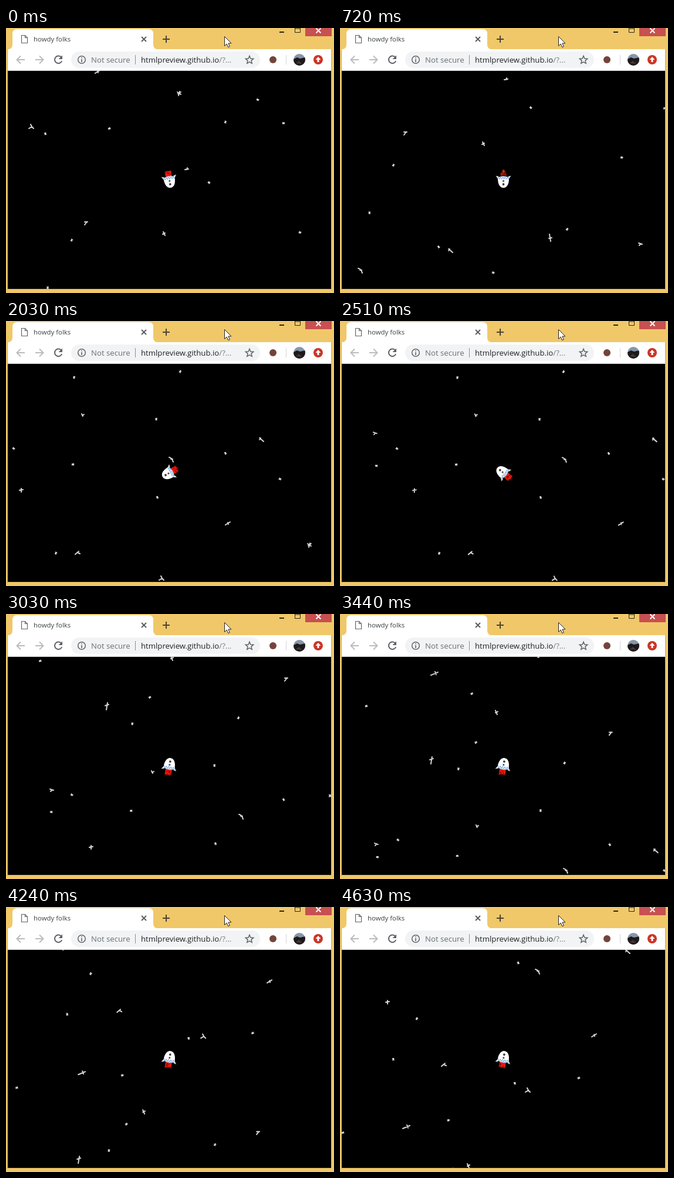
An HTML page with a canvas for the animation above (4.71 s loop, 559x451 px).

```html
<!DOCTYPE html>
<html lang="en">
<head>
<meta charset="utf-8">
<title>howdy folks</title>
<style>
  html, body { margin: 0; width: 100%; height: 100%; overflow: hidden; background: #f0c869; }
  svg, canvas { position: absolute; display: block; }
  svg { left: 0; top: 0; }
  canvas { left: 3px; top: 73px; background: #000; }
  text { font-family: "Open Sans", "Noto Sans", sans-serif; }
  .line { fill: none; stroke-width: 2; }
</style>
</head>
<body>
<svg width="559" height="451" viewBox="0 0 559 451">
  <rect width="559" height="451" fill="#f0c869"/>
  <rect x="2" y="36" width="553" height="409" fill="#d5b15c"/>
  <rect x="3" y="36" width="551" height="37" fill="#fff"/>
  <path d="M3 36.500Q11 36 11 28V10Q11 2 19 2H243Q251 2 251 10V28Q251 36 259 36.500Z" fill="#fff"/>
  <path d="M3 72.500H554" stroke="#d4d6d9"/>

  <!-- tab -->
  <path d="M26.500 12.500H32.500L36.500 16.500V25.500H26.500ZM32.500 12.500V16.500H36.500" fill="#fff" stroke="#5f6368" stroke-width="1.200"/>
  <text x="47" y="23" font-size="11.400" fill="#3c4043">howdy folks</text>
  <path class="line" d="M231 15L239 23M239 15L231 23" stroke="#5a5e62" stroke-width="1.600"/>
  <path class="line" d="M267 19H279M273 13V25" stroke="#4b4434"/>

  <!-- window buttons -->
  <path class="line" d="M466 7H474" stroke="#2b2618"/>
  <path d="M492.500 0V7.500H501.500V0M492 1H502" fill="none" stroke="#2b2618"/>
  <rect x="510" width="45" height="14" fill="#c75050"/>
  <path class="line" d="M528.500 0.500L536.500 8.500M536.500 0.500L528.500 8.500" stroke="#fff" stroke-width="1.700"/>

  <!-- toolbar -->
  <g class="line">
    <path d="M32 54H19M25 47.500L18.500 54L25 60.500M50 54H63M57 47.500L63.500 54L57 60.500" stroke="#babcbe"/>
    <path d="M94.300 50A6.300 6.300 0 1 0 95.200 56" stroke="#5f6368"/>
  </g>
  <path d="M96 46.500V53H89.500Z" fill="#5f6368"/>
  <rect x="111" y="40" width="322" height="28" rx="14" fill="#f1f3f4"/>
  <circle cx="129" cy="54" r="6.300" fill="none" stroke="#5f6368" stroke-width="1.500"/>
  <path d="M129 53V58M129 50V51.600" stroke="#5f6368" stroke-width="1.600"/>
  <text x="145" y="59" font-size="13.200" fill="#6b6f73">Not secure</text>
  <path d="M220.500 46V62" stroke="#8b8f94"/>
  <text x="230" y="59" font-size="13.200" fill="#202124">htmlpreview.github.io<tspan fill="#777b80">/?...</tspan></text>
  <path d="M415 47.500L416.900 52L421.700 52.400L418 55.600L419.200 60.300L415 57.800L410.800 60.300L412 55.600L408.300 52.400L413.100 52Z" fill="none" stroke="#5f6368" stroke-width="1.500"/>
  <circle cx="455" cy="54" r="6" fill="#74443a"/>
  <path d="M477.500 46V62" stroke="#d4d6d9"/>
  <clipPath id="round"><circle cx="500" cy="54" r="10"/></clipPath>
  <g clip-path="url(#round)">
    <rect x="490" y="44" width="20" height="20" fill="#8796a8"/>
    <path d="M490 53L496 50L501 52L510 50V64H490Z" fill="#1d1a1c"/>
    <path d="M494 60L499 56L505 61Z" fill="#4a3734"/>
  </g>
  <circle cx="532" cy="54" r="8" fill="#cb3527"/>
  <path d="M532 49L536.500 54H533.500V58H530.500V54H527.500Z" fill="#fff"/>

  <path d="M372.500 14.500V30.500L376.200 27L378.700 32.700L381.300 31.600L378.900 26H384Z" fill="#fff" stroke="#222"/>
</svg>
<canvas width="551" height="371"></canvas>

<script>
const LOOP = 4710, TILE_W = 800, TILE_H = 600, FAR = 5 / 6;
const ctx = document.querySelector('canvas').getContext('2d');

// Runs of evenly spaced redraws: first time, last time, count
const RUNS = [[0, 0, 1], [70, 540, 7], [630, 720, 2], [790, 1110, 5], [1190, 1340, 3],
  [1430, 1660, 4], [1740, 2030, 5], [2120, 2200, 2], [2290, 2800, 8], [2880, 3030, 3],
  [3110, 3350, 4], [3440, 3920, 7], [4010, 4460, 7], [4560, 4630, 2]];
const ticks = RUNS.flatMap(([a, b, n]) =>
  Array.from({ length: n }, (_, i) => n > 1 ? a + (b - a) * i / (n - 1) : a));

// Flight path: time, drift x, drift y, heading in degrees
const PATH = [[0, 0, 0, 80], [630, -22, -134, 80], [720, -25, -153, 90], [842, -17, -182, 120],
  [965, 5, -204, 150], [1340, 87, -252, 150], [2030, 222, -330, 150], [2130, 242, -342, 150],
  [2360, 295, -349, 193], [2590, 338, -319, 237], [2820, 349, -267, 280], [3030, 341, -221, 280],
  [3920, 306, -21, 280], [4630, 277, 144, 280], [LOOP, 274, 163, 280]];

const farStars = [[429, 122], [374, 160], [473, 162], [67, 180], [176, 171], [346, 263],
  [112, 361], [501, 348], [71, 442], [574, 264], [189, 500], [408, 470], [282, 544],
  [731, 371], [729, 519], [73, 575], [761, 326], [628, 492], [700, 70], [593, 521],
  [660, 139], [754, 243]];

const nearStars = [
  [156, 74, 'M-4 3L4-2M0-1L1 2'], [295, 111, 'M-3-2L3 2M1-3L-1 4M3-2L-2 1'],
  [43, 168, 'M-4 3L1 0L4 3M-1-4L1 0'], [308, 240, 'M-3 1L3 0M1-2L0 1'],
  [136, 332, 'M-2-2L3-2M-2 3L1-1'], [269, 350, 'M-1-3L2 3M2-1L-2 1'],
  [213, 532, 'M-3-3L4 3M-3 0L-1-3'], [383, 510, 'M-1-6L1 6M-2 1L3 0'],
  [537, 521, 'M-3-2L3 0M-2 2L0 0'], [60, 566, 'M-4-4Q1-3 3 4M-1-1L2-1'],
  [453, 55, 'M-3-1L1 0L2 2M-1 0L2-1'], [709, 490, 'M-2-2L0 2M-1 1L2-1'],
  [604, 18, 'M-3 0L3-1M0-3L0 3'], [700, 124, 'M-4 3L2-2M0 0L4 2'],
  [742, 296, 'M-2-3L1 4M-2 1L2-1'], [631, 378, 'M1-6L-1 6M-3-1L3-3'],
  [636, 230, 'M-6 3L6-2M1-3L3 2']
].map(([x, y, d]) => [x, y, new Path2D(d)]);

const speck = new Path2D('M-1.500 0L1.500 0M-.5-1.200L.5 1.500');
const hull = new Path2D('M-9.500 4C-10-6-6.500-13.500 0-13.500C6.500-13.500 10-6 9.500 4Q0 9-9.500 4Z');
const fins = new Path2D('M-9 1L-13 7L-8 6ZM9 1L13 7L8 6Z');

const mod = (v, n) => (v % n + n) % n;
const noise = n => mod(Math.sin(n * 12.9898) * 43758.5453, 1);

function pose(t) {
  const i = Math.max(1, PATH.findIndex(k => k[0] >= t));
  const a = PATH[i - 1], b = PATH[i], f = (t - a[0]) / (b[0] - a[0]);
  return [1, 2, 3].map(c => a[c] + (b[c] - a[c]) * f);
}

function drawStar(x, y, shape, angle) {
  ctx.save();
  ctx.translate(mod(x + 100, TILE_W) - 100, mod(y + 100, TILE_H) - 100);
  ctx.rotate(angle);
  ctx.stroke(shape);
  ctx.restore();
}

function dot(x, y, r, color) {
  ctx.fillStyle = color;
  ctx.beginPath();
  ctx.arc(x, y, r, 0, 7);
  ctx.fill();
}

function drawFlame(n) {
  if (n % 4 === 1) {
    ctx.fillStyle = '#8e1505';
    ctx.fill(new Path2D('M-6 7L6 7L4 13L0 18.500L-4 13Z'));
    for (let i = 0; i < 16; i++) {
      const y = 7 + noise(n + i) * 9;
      dot((noise(n * 3 + i) - .5) * (19 - y), y, .8, i % 3 ? '#dc3a17' : '#180000');
    }
    return;
  }
  ctx.fillStyle = '#e3180b';
  ctx.beginPath();
  ctx.moveTo(-5.500, 6);
  for (let i = 0; i <= 8; i++) ctx.lineTo(-5.500 + i * 11 / 8, (i % 2 ? 13 : 15.500) + noise(n + i) * 2);
  ctx.lineTo(5.500, 6);
  ctx.fill();
  for (let i = 0; i < 7; i++) dot((noise(n + i) - .5) * 9, 9 + noise(n * 2 + i) * 5, .7, '#4a0000');
}

function drawShip(heading, n) {
  ctx.save();
  ctx.translate(278.500, 258.500);
  ctx.rotate((heading + 90) * Math.PI / 180);
  drawFlame(n);
  ctx.fillStyle = '#d9dce0';
  ctx.fill(fins);
  ctx.fillStyle = '#fff';
  ctx.fill(hull);
  ctx.save();
  ctx.clip(hull);
  ctx.fillStyle = '#70a5df';
  for (let row = 0; row < 3; row++)
    for (let x = -10 + row % 2 * 2; x < 10; x += 4) ctx.fillRect(x, 1 + row * 2, 2, 2);
  ctx.restore();
  dot(0, -7.500, 1.900, '#3c3c3c');
  dot(0, -1.800, 1.600, '#555');
  ctx.restore();
}

const start = performance.now();
function draw() {
  const t = (performance.now() - start) % LOOP;
  const n = ticks.filter(k => k <= t).length - 1;
  const [dx, dy, heading] = pose(ticks[n]);
  ctx.setTransform(1, 0, 0, 1, -3, -73);
  ctx.fillStyle = '#000';
  ctx.fillRect(0, 0, 559, 451);
  ctx.lineCap = 'round';
  ctx.strokeStyle = '#d6d6d6';
  ctx.lineWidth = 2;
  farStars.forEach(([x, y], i) => drawStar(x + dx * FAR, y + dy * FAR, speck, i * 1.300));
  nearStars.forEach(([x, y, shape]) => drawStar(x + dx, y + dy, shape, 0));
  drawShip(Math.round(heading / 10) * 10, n);
  requestAnimationFrame(draw);
}
draw();
</script>
</body>
</html>
```
